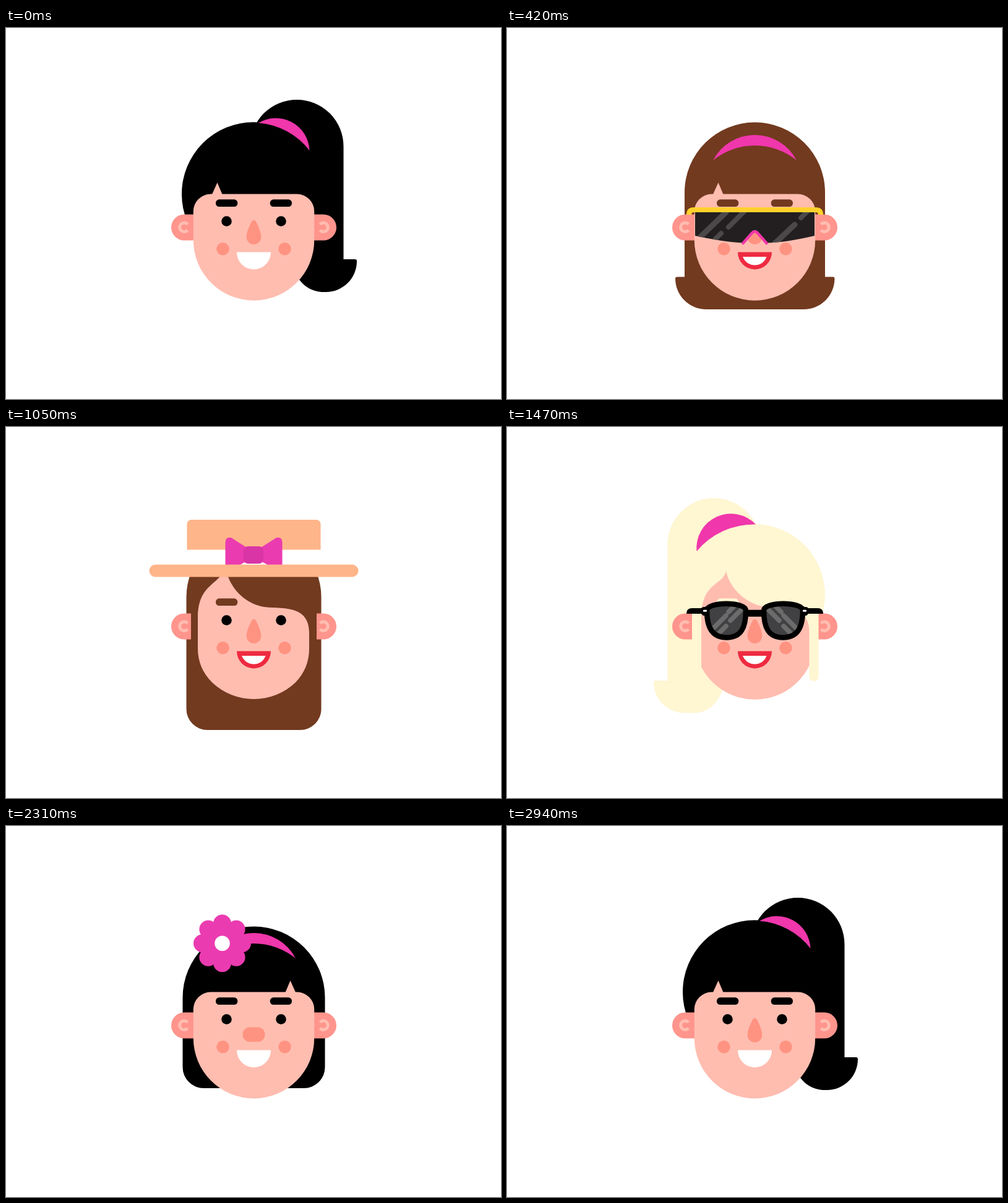
These frames come from a looping animation (800x600 px, 2.97 s). An HTML page:

```html
<!DOCTYPE html>
<html lang="en">
<head>
<meta charset="utf-8">
<title>Hairstyles</title>
<style>
html, body { margin: 0; width: 100%; height: 100%; overflow: hidden; background: #fff; }
svg { display: block; width: 100vw; height: 100vh; }
</style>
</head>
<body>
<svg id="stage" viewBox="0 0 800 600"></svg>
<script>
const BLACK = '#000', BROWN = '#723a1f', CREAM = '#fff6d2', RED = '#f12541';
const SKIN = '#ffbdb0', EAR = '#ff958d', BLUSH = '#ff9382', PINK = '#f037ab';
const BOW = '#eb3bb0', STRAW = '#ffb58a', LENS = '#231f20', LIPS = '#ee2a40';
const STEP = 210, LOOP = 2970;

const path = (d, fill) => `<path d="${d}" fill="${fill}"/>`;
const line = (d, color, w, cap = 'round') =>
  `<path d="${d}" fill="none" stroke="${color}" stroke-width="${w}" stroke-linecap="${cap}" stroke-linejoin="round"/>`;
const disc = (x, y, r, fill) => `<circle cx="${x}" cy="${y}" r="${r}" fill="${fill}"/>`;
const rect = (x, y, w, h, fill, r = 0) =>
  `<rect x="${x}" y="${y}" width="${w}" height="${h}" rx="${r}" fill="${fill}"/>`;
const flip = s => `<g transform="matrix(-1 0 0 1 801 0)">${s}</g>`;
const both = s => s + flip(s);
const clip = (id, s) => `<g clip-path="url(#${id})">${s}</g>`;

// Back hair
const dome = (x, top, bottom, r, c) => {
  const R = 400.5 - x;
  return path(`M${x} ${top + R}a${R} ${R} 0 0 1 ${2 * R} 0V${bottom - r}a${r} ${r} 0 0 1 ${-r} ${r}H${x + r}a${r} ${r} 0 0 1 ${-r} ${-r}Z`, c);
};
const ponyRight = c => disc(400.3, 268.5, 116.3, c) +
  path('M394.5 191.5a75.5 75.5 0 0 1 151 0V374H564q3 0 3 3a50 50 0 0 1-50 50h-5Q488 426 474 407L400 320Z', c);
const ponyLeft = c => disc(399.5, 271.5, 114.5, c) +
  path('M259.5 192.5a75 75 0 0 1 143-34L400 300V388L348 426Q334 462.5 302 462.5H288a50 50 0 0 1-51-49.500q0-3 3-3H259.500Z', c);
const flare = c =>
  path('M287 266a113.500 113.500 0 0 1 227 0V402.500H526.500q3 0 3 3a50 50 0 0 1-50 49.500H322a50 50 0 0 1-50-49.500q0-3 3-3H287Z', c);
const bun = c => disc(400.5, 113, 54, c) + dome(285.5, 157, 363, 3, c);
const bob = c => dome(285.5, 162.5, 424, 34, c);
const crop = c => dome(285.5, 157, 363, 1, c);
const long = c => dome(291.5, 166, 490, 34, c);
const afro = c => disc(401, 236, 139, c);

// Faces
const ears = both(path('M303 301.500H288a21 21 0 0 0 0 42H303Z', EAR) +
  line('M293.500 317.500a7.300 7.300 0 1 0 0 9.500', SKIN, 5, 'butt'));
const ROUND = 'a97.700 97.700 0 0 1';
const face = path(`M302.800 343V296.500a28 28 0 0 1 28-28H470.200a28 28 0 0 1 28 28V343${ROUND}-195.400 0Z`, SKIN);
const notch = path('M333 269L341.500 250L349.500 269Z', SKIN);
const straight = () => face + notch;
const straightFlip = () => face + flip(notch);
const swept = (l, r, top, lower) => path(`M354 ${top}C350 256 ${l} 250 ${l} 308${lower}V335C${r} 300 470 293 430 292C390 292 360 262 354 ${top}Z`, SKIN);
const sweptLong = c => rect(299, 270, 203, 170, c) +
  swept(310, 490, 224, 'V358Q310 390 333 413A97.700 97.700 0 0 0 468 413Q490 390 490 358');
const sweptTail = c => rect(299, 260, 101, 128, c) + rect(400, 260, 88.5, 40, c) +
  swept(314, 489, 233, 'V388A97.700 97.700 0 0 0 489 385') + rect(488.5, 280, 15, 131, c, 7);
const sweptCrop = c => rect(298, 260, 205, 103, c) +
  swept(313, 488, 224, 'V335C313 348 318 356 324 360Q324 363 321 363H304.800A97.700 97.700 0 0 0 496.200 363H480Q477 363 477 360C483 356 488 348 488 335');

const drop = path('M397 313Q400.500 308 404 313C408 321 412.300 330 412.300 338a11.800 12 0 0 1-23.600 0C388.700 330 393 321 397 313Z', BLUSH);
const wide = rect(382.5, 325.5, 36, 23.5, BLUSH, 11.5);
const broad = path('M391 312Q400.500 302 410 312L412 330Q420 335 420 342Q419 351 410 348.500Q405 345 400.500 350Q396 345 391 348.500Q382 351 381 342Q381 335 389 330Z', BLUSH);
const smile = c => path('M373 362.500H428a27.500 28 0 0 1-55 0Z', c);
const plain = smile('#fff');
const lipstick = smile(LIPS) + path('M381 370H419.500C416 379 409 383.500 400.500 383.500S385 379 381 370Z', '#fff');
const eyes = both(disc(356.5, 312.5, 8.3, BLACK));
const cheeks = both(disc(350.5, 357.3, 10.3, BLUSH));
const brows = c => both(rect(339, 277.3, 35.3, 11.7, c, 5.5));

// Accessories
const tieRight = path('M408 153.500A54.500 54.500 0 0 1 490.500 198A116 116 0 0 0 408 153.500Z', PINK);
const tieLeft = path('M306.500 201A55.500 55.500 0 0 1 402 157.500A121 121 0 0 0 306.500 201Z', PINK);
const band = path('M333 214A76 76 0 0 1 468 214A107 107 0 0 0 333 214Z', PINK);
const flower = Array.from({ length: 8 }, (_, i) =>
  disc(349.5 + 32 * Math.cos(i * Math.PI / 4), 189.7 + 32 * Math.sin(i * Math.PI / 4), 14.5, BOW)).join('') +
  disc(349.5, 189.7, 31, BOW) + disc(349.5, 189.7, 12.3, '#fff');
const boater = rect(292.5, 150, 216, 80, STRAW, 7) + rect(291.5, 198.5, 218, 26, '#fff') +
  both(path('M400 202L364 179Q354.500 177 354.500 187V223H378L400 211Z', BOW)) +
  rect(384, 193, 32, 28, '#d935a7', 7) + rect(231.5, 222.5, 338, 20, STRAW, 10);
const sunhat = path('M293 232V218a107.500 99 0 0 1 215 0V232Z', STRAW) +
  rect(293, 199, 215, 24, PINK) + rect(226, 222.5, 349, 20, STRAW, 10);
const earrings = both(rect(288.3, 342, 6, 22, '#fff') + disc(291, 342, 7, '#fff') + disc(291, 364.5, 10.5, '#fff'));

const VISOR = 'M304 297H497V336Q450 347 419 347.500L405 331q-4.500-5-9 0L381.500 347.500Q350 346 304 336Z';
const DARK = 'M323 297C323 282 386 282 386 297C386 325 378 340.500 355 340.500C332 340.500 323 325 323 297Z';
const visor = path(VISOR, LENS) +
  clip('visor', line('M304 346L354 298M432 349L465 318', '#4b4849', 9) +
    line('M336 342L346 332M358 322L384 296M475 307L487 295', '#4b4849', 8)) +
  line('M294 302Q294 294 302 294H499Q507 294 507 302', '#ffd12c', 8, 'butt') +
  line('M381.500 348L396 331.500q4.500-5 9 0L419.500 348', PINK, 4.5);
const glints = color => line('M337 320L359 299M345 328L353 320M361 314L379 297', color, 8) +
  line('M362 297L368 291', color, 7);
const side = path(DARK, '#414042') + clip('dark', line('M330 329L354 305M343 333L354 322M361 313L381 293M358 299L367 290', '#6b6b6c', 7.5)) +
  line(DARK, BLACK, 8.5) +
  path('M290 302Q290 293 299 293H314Q316 290 326 291V305H317L314 302Z', BLACK) +
  rect(317, 295.7, 6, 3, '#fff', 1);
const shades = both(side) + line('M386 301Q400.500 301.500 415 301', BLACK, 11, 'butt');
const roundSide = disc(356, 312, 26, LENS) + clip('round', glints('#4b4849')) +
  `<circle cx="356" cy="312" r="28.300" fill="none" stroke="#fff" stroke-width="8.500"/>` +
  line('M328 304.500L301 296Q293 294 293 300', '#fff', 8);
const specs = both(roundSide) + line('M386 309Q389 302.500 400.500 302.500T415 309', '#fff', 7, 'butt');

const girl = (c, back, front, { nose = drop, mouth = plain, under = '', extra = '' } = {}) =>
  back(c) + under + ears + front(c) + brows(c) + eyes + nose + cheeks + mouth + extra;

const cast = [
  girl(BLACK, ponyRight, straight, { under: tieRight }),
  girl(RED, bun, straight),
  girl(BROWN, flare, straight, { mouth: lipstick, under: band, extra: visor }),
  girl(BLACK, afro, straight, { nose: wide, mouth: lipstick }),
  girl(RED, crop, sweptCrop, { mouth: lipstick }),
  girl(BROWN, long, sweptLong, { mouth: lipstick, extra: boater }),
  girl(BLACK, bob, straight, { mouth: lipstick, under: band }),
  girl(CREAM, ponyLeft, sweptTail, { mouth: lipstick, under: tieLeft, extra: shades }),
  girl(BROWN, bun, sweptCrop),
  girl(RED, crop, sweptCrop, { nose: broad, mouth: lipstick, extra: specs + earrings }),
  girl(BROWN, crop, sweptCrop, { extra: sunhat }),
  girl(BLACK, bob, straightFlip, { nose: wide, under: band + flower }),
  girl(BROWN, long, sweptLong, { mouth: lipstick }),
  girl(BLACK, crop, sweptCrop)
];

const stage = document.getElementById('stage');
stage.innerHTML = `<defs><clipPath id="visor"><path d="${VISOR}"/></clipPath>` +
  `<clipPath id="dark"><path d="${DARK}"/></clipPath>` +
  `<clipPath id="round"><circle cx="356" cy="312" r="24"/></clipPath></defs>` +
  cast.map(s => `<g class="girl" display="none">${s}</g>`).join('');
const girls = [...stage.querySelectorAll('.girl')];
let shown = -1;

function update(t) {
  const next = Math.floor((t % LOOP) / STEP) % girls.length;
  if (next === shown) return;
  girls.forEach((g, i) => g.setAttribute('display', i === next ? 'inline' : 'none'));
  shown = next;
}

const start = performance.now();
function tick() {
  update(performance.now() - start);
  requestAnimationFrame(tick);
}
tick();
</script>
</body>
</html>
```
